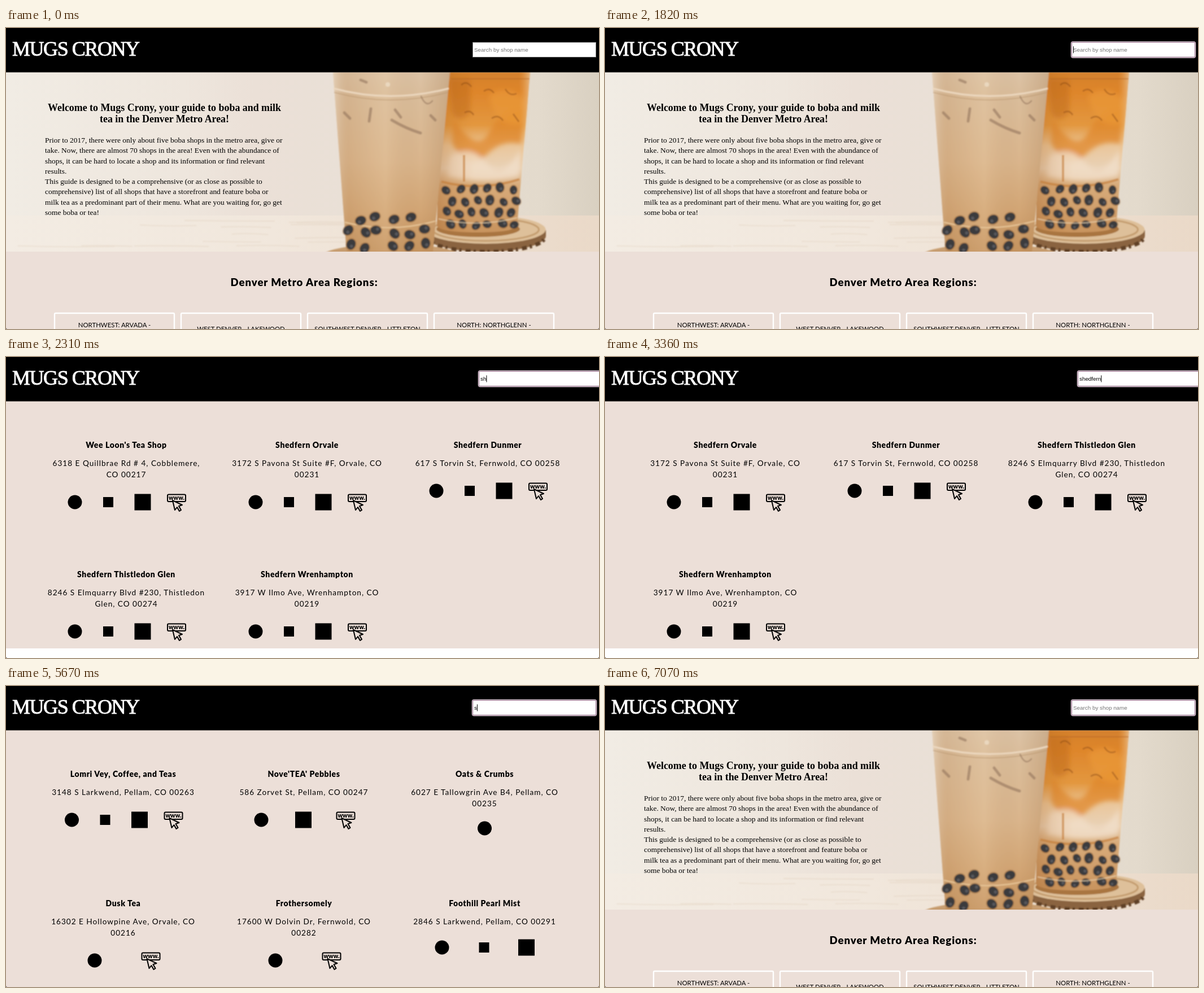
An HTML page that plays this animation: 1050 px wide and 533 px high, repeating every 7560 ms.

```html
<!DOCTYPE html>
<html lang="en">
<head>
<meta charset="utf-8">
<title>Mugs Crony</title>
<style>
  html, body { margin: 0; width: 100%; height: 100%; overflow: hidden; background: #ecdfd8; }
  svg { display: block; width: 100vw; height: 100vh; }
  text { white-space: pre; }
  .logo { font: 36px "Liberation Serif", serif; letter-spacing: -1.45px; fill: #fff; stroke: #fff; stroke-width: .9px; }
  .welcome { font: bold 17.9px "Liberation Serif", serif; text-anchor: middle; }
  .intro { font: 13.45px "Liberation Serif", serif; }
  .regions { font: 900 18.6px Lato, sans-serif; letter-spacing: .95px; text-anchor: middle; }
  .region { font: 11.4px Lato, sans-serif; text-anchor: middle; }
  .name { font: 900 14px Lato, sans-serif; letter-spacing: .6px; text-anchor: middle; }
  .addr { font: 13.6px Lato, sans-serif; letter-spacing: 1px; text-anchor: middle; }
  .www { font: 900 10.5px Lato, sans-serif; text-anchor: middle; }
  .field { font: 9.85px "Liberation Sans", sans-serif; }
</style>
</head>
<body>
<svg viewBox="0 0 1050 533" preserveAspectRatio="none">
  <defs>
    <linearGradient id="wall">
      <stop offset="0" stop-color="#f1ece4"/><stop offset=".3" stop-color="#eee6dd"/>
      <stop offset=".42" stop-color="#ebe0d7"/><stop offset=".6" stop-color="#e9e0d6"/>
      <stop offset=".9" stop-color="#e3dacc"/><stop offset="1" stop-color="#d9d0c1"/>
    </linearGradient>
    <linearGradient id="table">
      <stop offset="0" stop-color="#f3ece3"/><stop offset=".45" stop-color="#f1e7dc"/>
      <stop offset="1" stop-color="#ead9c8"/>
    </linearGradient>
    <linearGradient id="milk" x2="0" y2="1">
      <stop offset="0" stop-color="#dcc3a6"/><stop offset=".14" stop-color="#dabd9b"/>
      <stop offset=".5" stop-color="#dab58c"/><stop offset=".78" stop-color="#d2a574"/>
      <stop offset="1" stop-color="#c4935f"/>
    </linearGradient>
    <linearGradient id="shade">
      <stop offset="0" stop-color="#ead8c2" stop-opacity=".6"/><stop offset=".14" stop-color="#b98b5c" stop-opacity=".2"/>
      <stop offset=".45" stop-color="#f1d4ae" stop-opacity=".2"/>
      <stop offset=".75" stop-color="#96683c" stop-opacity="0"/><stop offset="1" stop-color="#96683c" stop-opacity=".25"/>
    </linearGradient>
    <linearGradient id="thai" x2="0" y2="1">
      <stop offset="0" stop-color="#d07d2c"/><stop offset=".12" stop-color="#dc8228"/>
      <stop offset=".33" stop-color="#e1963f"/><stop offset=".46" stop-color="#e9cba6"/>
      <stop offset=".6" stop-color="#e8d8c5"/><stop offset=".7" stop-color="#d5ad82"/>
      <stop offset="1" stop-color="#c39262"/>
    </linearGradient>
    <linearGradient id="glass">
      <stop offset="0" stop-color="#a9601d" stop-opacity=".35"/><stop offset=".4" stop-color="#f0a040" stop-opacity=".12"/>
      <stop offset=".88" stop-color="#f0a040" stop-opacity=".1"/><stop offset="1" stop-color="#f2dcbd" stop-opacity=".6"/>
    </linearGradient>
    <clipPath id="frame"><rect y="78" width="1050" height="318"/></clipPath>
    <filter id="soft"><feGaussianBlur stdDeviation=".8"/></filter>
    <filter id="haze" x="-30%" y="-30%" width="160%" height="160%"><feGaussianBlur stdDeviation="4"/></filter>
  </defs>
  <rect width="1050" height="533" fill="#ecdfd8"/>

  <g id="home">
    <g clip-path="url(#frame)">
      <rect y="78" width="1050" height="318" fill="url(#wall)"/>
      <rect y="332" width="1050" height="64" fill="url(#table)"/>
      <g id="grain" fill="none" stroke="#e4d5c4" stroke-width="1.6" opacity=".6" filter="url(#soft)"/>
      <g filter="url(#soft)">
        <path d="M743 358V368A106 28 0 0 0 956 368V358Z" fill="#8a633f"/>
        <path d="M746 370A104 26 0 0 0 954 370" fill="none" stroke="#5f4027" stroke-width="7" stroke-dasharray="9 5 4 7"/>
        <ellipse cx="849.5" cy="357" rx="106" ry="25" fill="#dec09a"/>
        <ellipse cx="849.5" cy="357" rx="94" ry="20" fill="none" stroke="#c39b6d" stroke-width="3"/>
        <ellipse cx="836" cy="356" rx="74" ry="14" fill="#a9743f"/>
        <path id="tea" d="M770 78H928L905 350Q900 362 835 362Q768 362 763 350Z" fill="url(#thai)"/>
        <g filter="url(#haze)">
          <path d="M792 160Q835 225 855 185T918 140L912 205Q880 195 850 225T790 205Z" fill="#de8526" opacity=".75"/>
          <path d="M786 228Q820 205 850 238T912 215L908 262Q850 278 782 262Z" fill="#f1e6d9" opacity=".85"/>
          <path d="M785 90H822V150Q800 170 790 150Z" fill="#b96519" opacity=".5"/>
          <path d="M855 120Q890 95 920 130L914 170Q870 180 855 120Z" fill="#eb9a3a" opacity=".6"/>
        </g>
        <path d="M770 78H928L905 350Q900 362 835 362Q768 362 763 350Z" fill="url(#glass)"/>
        <path d="M788 90H927" stroke="#b9692a" stroke-width="2" opacity=".6"/>
        <g fill="none" stroke="#8a4a18" stroke-width="2.5" opacity=".5">
          <path d="M806 101Q815 92 824 104M846 112Q855 104 864 115M884 108Q892 122 904 116M812 150Q822 144 828 154M860 160Q872 152 880 164M898 152L908 166"/>
        </g>
        <path d="M771 272Q840 290 909 268M811 225V272" fill="none" stroke="#c47a34" stroke-width="4" opacity=".6"/>
        <g id="backPearls"/>
        <path d="M766 338Q835 354 905 336" fill="none" stroke="#ecd3b0" stroke-width="2" opacity=".7"/>

        <ellipse cx="682" cy="402" rx="119" ry="19" fill="#c79d70"/>
        <path d="M579 78H786L756 396H603Z" fill="url(#milk)"/>
        <path d="M579 78H786L756 396H603Z" fill="url(#shade)"/>
        <path d="M580 107Q680 134 784 107" fill="none" stroke="#ecd8bf" stroke-width="3"/>
        <path d="M581 114Q680 141 783 114" fill="none" stroke="#b9956e" stroke-width="1"/>
        <g fill="none" stroke="#8d6f58" stroke-width="5" stroke-linecap="round" opacity=".55">
          <path d="M646 143L643 165M683 163Q708 178 734 186M689 145L699 158M599 150L609 160M628 92L638 96M752 155L760 163"/>
          <path d="M735 121Q744 142 755 129" stroke-width="2.5"/>
        </g>
        <circle cx="676" cy="100" r="4" fill="#ead8bf"/>
        <path d="M600 344Q680 364 760 342" fill="none" stroke="#e8c699" stroke-width="2"/>
        <g id="frontPearls"/>
      </g>
    </g>
    <g id="copy"/>
  </g>

  <g id="list"/>

  <rect width="1050" height="78.5"/>
  <text class="logo" x="11" y="49">MUGS CRONY</text>
  <g id="search">
    <rect id="ring" x="825.5" y="24.5" width="220" height="28" rx="3" fill="#9b7390" stroke="#f0dfe9" stroke-width="1.4"/>
    <rect id="box" x="826.5" y="25.5" width="218" height="26" fill="#fff" stroke="#858585"/>
    <rect id="mark" x="829" y="32" height="13" fill="#f3d3e4"/>
    <text id="field" class="field" x="829" y="42"/>
    <rect id="caret" y="32.5" width="1" height="12"/>
  </g>
  <path d="M0 531L2 533H0ZM1050 531L1048 533H1050Z" fill="#777"/>
</svg>
<script>
const LOOP = 7560, INK = '#000', PEARL = '#3a3a3d';
const $ = id => document.getElementById(id);

function add(parent, tag, attrs, text) {
  const el = document.createElementNS('http://www.w3.org/2000/svg', tag);
  for (const k in attrs) el.setAttribute(k, attrs[k]);
  if (text) el.textContent = text;
  return parent.appendChild(el);
}
const label = (parent, cls, x, y, text) => add(parent, 'text', { class: cls, x, y }, text);

let seed = 7;
const rand = () => (seed = seed * 16807 % 2147483647) / 2147483647;

// Drink photo details
function pearl(parent, x, y, r) {
  const g = add(parent, 'g', { transform: `translate(${x} ${y}) rotate(${rand() * 180})` });
  add(g, 'ellipse', { rx: r + 1.5, ry: r, fill: '#8f6238', opacity: .45 });
  add(g, 'ellipse', { rx: r, ry: r * .82, fill: PEARL });
  add(g, 'circle', { cx: r * .3, cy: -r * .2, r: r * .3, fill: '#56575b' });
}
for (let row = 0; row < 4; row++)
  for (let i = 0; i < 6; i++)
    pearl($('backPearls'), 779 + i * 23 + (row % 2) * 8 - row * 1.5 + rand() * 5, 282 + row * 21 + rand() * 6, 7.5 + rand() * 2);
[[653, 334], [717, 335], [687, 339], [628, 341], [606, 358], [637, 362], [655, 358], [688, 364], [715, 366],
 [741, 356], [611, 383], [685, 386], [714, 386], [743, 381], [635, 390]]
  .forEach(([x, y]) => pearl($('frontPearls'), x, y, 9.5));
for (let i = 0; i < 14; i++) {
  const x = rand() * 560, y = 338 + rand() * 54, w = 60 + rand() * 130;
  add($('grain'), 'path', { d: `M${x} ${y}q${w / 2} ${rand() * 6 - 3} ${w} 1` });
}

// Home page copy
const copy = $('copy');
label(copy, 'welcome', 280.5, 147, 'Welcome to Mugs Crony, your guide to boba and milk');
label(copy, 'welcome', 280.5, 167, 'tea in the Denver Metro Area!');
['Prior to 2017, there were only about five boba shops in the metro area, give or',
 'take. Now, there are almost 70 shops in the area! Even with the abundance of',
 'shops, it can be hard to locate a shop and its information or find relevant',
 'results.',
 'This guide is designed to be a comprehensive (or as close as possible to',
 'comprehensive) list of all shops that have a storefront and feature boba or',
 'milk tea as a predominant part of their menu. What are you waiting for, go get',
 'some boba or tea!'].forEach((line, i) => label(copy, 'intro', 69, 203 + i * 18.25, line));
label(copy, 'regions', 528, 457, 'Denver Metro Area Regions:');
[['NORTHWEST: ARVADA -', 530], ['WEST DENVER - LAKEWOOD', 537],
 ['SOUTHWEST DENVER - LITTLETON', 537], ['NORTH: NORTHGLENN -', 530]].forEach(([text, y], i) => {
  const x = 86 + i * 224;
  add(copy, 'rect', { x, y: 505, width: 212, height: 60, rx: 2, fill: 'none', stroke: '#fff', 'stroke-width': 2.4 });
  label(copy, 'region', x + 106, y, text);
});

// Shops: name, address lines, links (r review, f feed, p photos, w website)
const shops = [
  ['Lomri Vey, Coffee, and Teas', '3148 S Larkwend, Pellam, CO 00263', '', 'rfpw'],
  ["Nove'TEA' Pebbles", '586 Zorvet St, Pellam, CO 00247', '', 'rpw'],
  ['Oats & Crumbs', '6027 E Tallowgrin Ave B4, Pellam, CO', '00235', 'r'],
  ['Dusk Tea', '16302 E Hollowpine Ave, Orvale, CO', '00216', 'rw'],
  ['Frothersomely', '17600 W Dolvin Dr, Fernwold, CO', '00282', 'rw'],
  ['Foothill Pearl Mist', '2846 S Larkwend, Pellam, CO 00291', '', 'rfp'],
  ["Wee Loon's Tea Shop", '6318 E Quillbrae Rd # 4, Cobblemere,', 'CO 00217', 'rfpw'],
  ['Shedfern Orvale', '3172 S Pavona St Suite #F, Orvale, CO', '00231', 'rfpw'],
  ['Shedfern Dunmer', '617 S Torvin St, Fernwold, CO 00258', '', 'rfpw'],
  ['Shedfern Thistledon Glen', '8246 S Elmquarry Blvd #230, Thistledon', 'Glen, CO 00274', 'rfpw'],
  ['Shedfern Wrenhampton', '3917 W Ilmo Ave, Wrenhampton, CO', '00219', 'rfpw']
];
const spread = { 1: [0], 2: [-50.5, 49], 3: [-75.5, -1, 74], 4: [-91, -32, 29, 89] };

function icon(parent, kind, x, y) {
  const g = add(parent, 'g', { transform: `translate(${x} ${y})` });
  const square = s => add(g, 'rect', { x: -s / 2, y: -s / 2, width: s, height: s, fill: INK });
  if (kind === 'r') add(g, 'circle', { r: 12.5, fill: INK });
  if (kind === 'f') square(18);
  if (kind === 'p') square(29);
  if (kind === 'w') {
    const line = { fill: '#ecdfd8', stroke: INK, 'stroke-width': 2, 'stroke-linejoin': 'round' };
    add(g, 'rect', { x: -16, y: -13.5, width: 32, height: 12.5, rx: 2, ...line });
    label(g, 'www', 0, -4, 'www.');
    add(g, 'path', { d: 'M-7 -3L-3 14L1 9L5 16L8 14L4 7L10 5Z', ...line });
  }
}

function showList(query) {
  const list = $('list');
  list.replaceChildren();
  const found = shops.filter(s => s[0].toLowerCase().includes(query));
  const left = found.length > 6 ? 207.5 : 213;
  found.slice(0, 6).forEach(([name, line1, line2, links], i) => {
    const x = left + i % 3 * 320, y = Math.floor(i / 3) * 229;
    label(list, 'name', x, y + 161, name);
    label(list, 'addr', x, y + 193, line1);
    if (line2) label(list, 'addr', x, y + 213, line2);
    const lift = links.includes('w') ? 0 : links.length > 1 ? 3 : 5;
    [...links].forEach((k, j) => icon(list, k, x + spread[links.length][j], y + (line2 ? 257 : 237) - lift));
  });
  if (found.length <= 6) add(list, 'rect', { y: 516, width: 1050, height: 17, fill: '#fff' });
  return found.length;
}

// Typing schedule: time, number of letters in the field
const WORD = 'shedfern';
const typing = [[0, 0], [1960, 1], [2240, 2], [2450, 3], [2590, 4], [2800, 5], [3220, 6], [3290, 7], [3360, 8],
  [4550, 7], [4760, 6], [4970, 5], [5110, 4], [5320, 3], [5460, 2], [5600, 1], [5740, 0]];
const FOCUS = 1400, SELECT = [4410, 4550];
const caretOff = [[0, FOCUS], [3850, 4550], [4970, 5460], [5950, 6440], [6930, LOOP]];
const within = (t, [a, b]) => t >= a && t < b;
const show = (el, on) => el.setAttribute('display', on ? 'inline' : 'none');

let shown = null;
function setQuery(query) {
  shown = query;
  const home = !query;
  show($('home'), home);
  show($('list'), !home);
  const count = home ? shops.length : showList(query);
  $('search').setAttribute('transform', `translate(${count > 6 ? 0 : 11} 0)`);
  const field = $('field');
  field.textContent = query || 'Search by shop name';
  field.setAttribute('fill', home ? '#757575' : INK);
  const width = home ? 0 : field.getComputedTextLength();
  $('caret').setAttribute('x', 829 + width);
  $('mark').setAttribute('width', width + 1);
}

function render(t) {
  const letters = typing.filter(([at]) => at <= t).pop()[1];
  const query = WORD.slice(0, letters);
  if (query !== shown) setQuery(query);
  show($('ring'), t >= FOCUS);
  $('box').setAttribute('stroke', t >= FOCUS ? '#8d6682' : '#858585');
  show($('mark'), within(t, SELECT));
  show($('caret'), !caretOff.some(span => within(t, span)));
}

const start = performance.now();
function tick() {
  render((performance.now() - start) % LOOP);
  requestAnimationFrame(tick);
}
tick();
</script>
</body>
</html>
```
